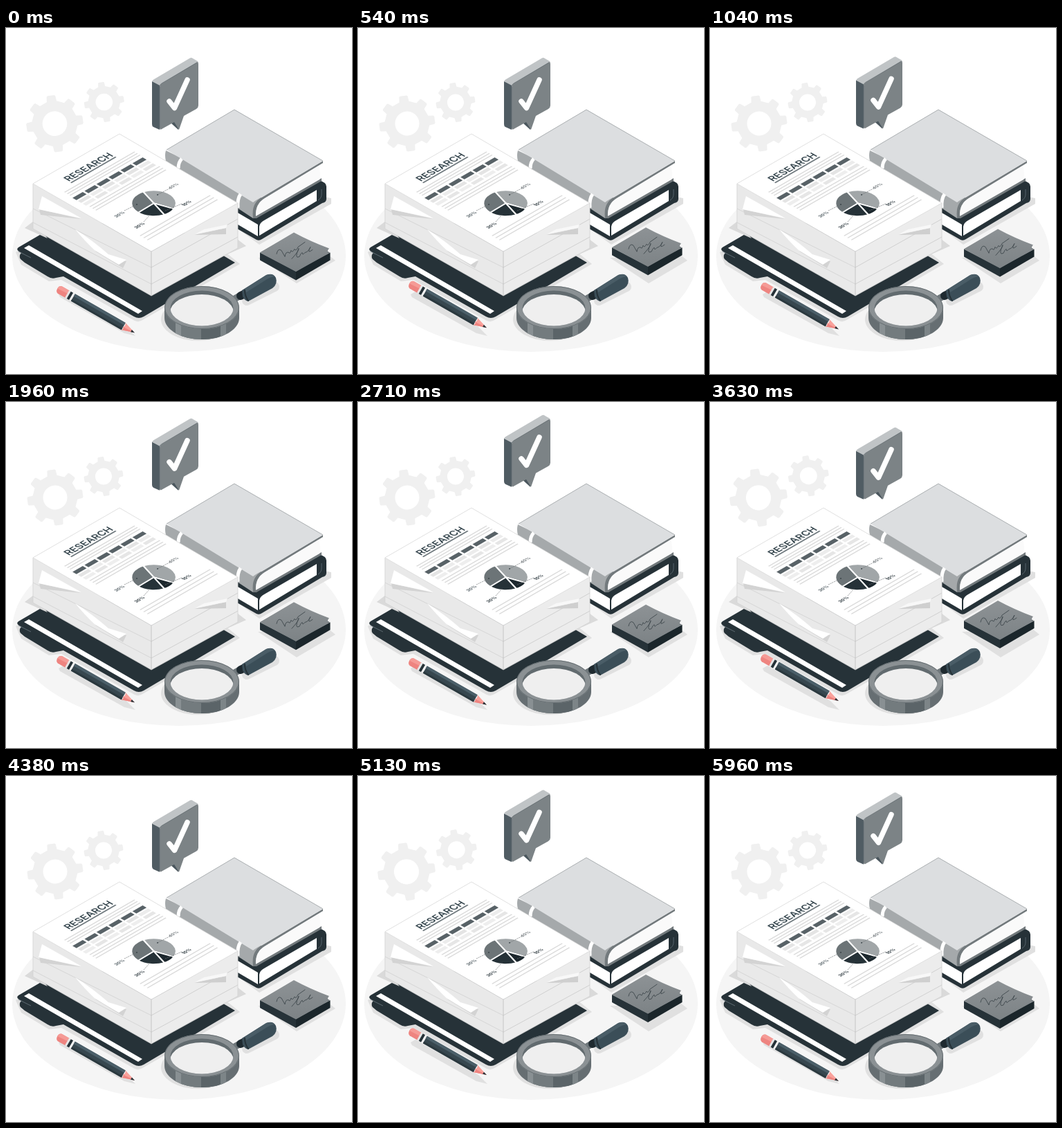
Write an HTML page with a canvas that moves like this. It is 500x500 px and loops after 6000 ms.

```html
<!DOCTYPE html>
<html lang="en">
<head>
<meta charset="utf-8">
<title>Research</title>
<style>
html, body { margin: 0; width: 100%; height: 100%; overflow: hidden; background: #fff; }
canvas { display: block; width: 500px; height: 500px; }
</style>
</head>
<body>
<canvas id="stage"></canvas>
<script>
const canvas = document.getElementById('stage');
const ctx = canvas.getContext('2d');
const ratio = Math.max(1, window.devicePixelRatio || 1);
canvas.width = canvas.height = 500 * ratio;

const LOOP = 6000, LEAD = 40, BEAT = 1500;
const TAU = Math.PI * 2, DEG = Math.PI / 180;
const DARK = '#263238', SLATE = '#37474f', SHADE = '#e0e0e0';

function fill(path, color) {
  ctx.fillStyle = color;
  ctx.fill(new Path2D(path));
}
function stroke(path, color, width = 1) {
  ctx.strokeStyle = color;
  ctx.lineWidth = width;
  ctx.stroke(new Path2D(path));
}
function oval(x, y, rx, ry, color) {
  ctx.fillStyle = color;
  ctx.beginPath();
  ctx.ellipse(x, y, rx, ry, 0, 0, TAU);
  ctx.fill();
}
function rect(x, y, w, h, color) {
  ctx.fillStyle = color;
  ctx.fillRect(x, y, w, h);
}
function group(draw) {
  ctx.save();
  draw();
  ctx.restore();
}

// 0 -> 1 -> 0 over one period
const swing = (t, period) => 1 - Math.abs(1 - 2 * (t % period) / period);

// two quick pulses, then rest
function heartbeat(t) {
  const p = (t % BEAT) / BEAT;
  if (p < 0.1) return p / 0.1;
  if (p < 0.3) return (0.3 - p) / 0.2;
  return Math.max(0, 1 - Math.abs(p - 0.5) / 0.1);
}

function gear(x, y, r, hole, angle) {
  group(() => {
    ctx.translate(x, y);
    ctx.rotate(angle);
    ctx.fillStyle = '#f0f0f0';
    ctx.beginPath();
    for (let i = 0; i < 8; i++) {
      const a = i * TAU / 8;
      const at = (rad, off) => ctx.lineTo(rad * Math.cos(a + off * DEG), rad * Math.sin(a + off * DEG));
      at(r * 0.8, -12.5);
      at(r * 0.98, -9);
      at(r, -6.5);
      at(r, 6.5);
      at(r * 0.98, 9);
      at(r * 0.8, 12.5);
    }
    ctx.closePath();
    ctx.moveTo(hole, 0);
    ctx.arc(0, 0, hole, 0, TAU, true);
    ctx.fill();
  });
}

function gears(pulse) {
  group(() => {
    const s = 1 + 0.07 * pulse;
    ctx.translate(100, 129);
    ctx.scale(s, s);
    ctx.translate(-100, -129);
    gear(71, 138, 40.5, 17.5, -8 * DEG);
    gear(141, 107.5, 28.5, 12, -9 * DEG);
  });
}

function books() {
  fill('M335 290 L366 313 L470 254 L470 246 L440 240 Z', SHADE);
  // lower book
  fill('M334 257 L360 272 L452 220 Q463 223 463 229 V247 Q463 252 457 253 L370 305 Q366 308 362 306 L334 290 Z', DARK);
  fill('M335 267 L364 284 V301 L335 284 Z', '#fff');
  fill('M366 287 Q367 281 373 278 L449 234 V250 L366 300 Z', '#fff');
  stroke('M451 249 Q456 246 456 240 V233', '#55626a', 1);
  // upper book
  fill('M231 177 Q229 184 231 192 L357 275 L372 247 L360 240 Z', '#a5a9ab');
  fill('M357 275 Q354 252 371 244 L458 192 V195 L374 246 Q360 254 361 272 L456 217 V221 L362 275 Z', '#737a7d');
  fill('M361 272 Q360 254 374 246 L452 199 Q455 209 453 219 Z', '#fafafa');
  fill('M330 118 L458 192 L374 242 Q362 248 357 252 L232 176 Z', '#dcdee0');
  stroke('M232 176 L330 118 L458 192', '#9a9fa1', 0.8);
  stroke('M254 189 Q249 194 249 203', '#fff', 5);
  stroke('M339 240 Q334 247 335 260', '#fff', 5);
}

function folder() {
  fill('M14 324 L22 342 L62 366 L80 364 L186 423 Q192 426 199 421 L338 341 L300 310 L54 300 Z', SHADE);
  fill('M54 296 L18 317 Q14 320 19 323 L22 325 Q18 329 21 334 L27 339 L60 359 Q66 363 72 361 L83 359 L185 417 Q192 421 199 417 L331 339 L215 270 Z', DARK);
  fill('M26 318 L33 314 L197 409 L191 413 Z', '#fff');
  stroke('M18 323 L36 332', '#75818a', 0.7);
}

function stack() {
  fill('M40 279 L27 289 L60 304 Z M334 305 L347 315 L320 327 Z', '#dadada');
  fill('M39 225 L210 323 V387 L39 290 Z', '#e9e9e9');
  fill('M210 323 L335 253 V318 L210 387 Z', '#ececec');
  stroke('M39 261 L210 346 M39 281 L210 370', '#d6d6d6', 1);
  stroke('M210 346 L335 276 M210 370 L335 302', '#d0d0d0', 1);
  stroke('M210 323 V387', '#bcbcbc', 0.8);
  stroke('M39 225 V290 L210 387 L335 318 V253', '#d2d2d2', 0.8);
  fill('M48 262 L50 270 L109 276 Z', '#d3d3d3');
  fill('M52 243 L109 275 L47 262 Z', '#fff');
  fill('M128 322 L169 347 L174 337 Z', '#d3d3d3');
  fill('M100 291 Q124 306 148 327 L174 335 L163 342 Q142 330 128 321 Q114 308 100 291 Z', '#fff');
  fill('M272 299 L318 289 V298 Z', '#cfcfcf');
  fill('M286 291 L320 284 L318 289 L273 298 Z', '#f8f8f8');
  fill('M164 153 L335 253 L210 323 L39 225 Z', '#fff');
  stroke('M39 225 L164 153 L335 253 L210 323 Z', '#d8d8d8', 0.8);
}

function pie(x, y, r) {
  const parts = [[40, '#a1a6a8'], [10, '#1c272d'], [20, DARK], [30, '#6c7477']];
  let a = -73 * DEG;
  for (const [share, color] of parts) {
    const b = a + share / 100 * TAU;
    ctx.beginPath();
    ctx.moveTo(x, y);
    ctx.arc(x, y, r, a, b);
    ctx.closePath();
    ctx.fillStyle = color;
    ctx.fill();
    ctx.strokeStyle = '#fff';
    ctx.lineWidth = 2;
    ctx.stroke();
    a = b;
  }
}

function report() {
  // sheet plane: u runs up-right, v runs down-right
  group(() => {
    ctx.transform(0.866, -0.5, 0.866, 0.5, 39, 225);
    ctx.textAlign = 'center';
    ctx.fillStyle = SLATE;
    ctx.font = '600 14px Inter, Roboto, sans-serif';
    ctx.fillText('RESEARCH', 70.5, 27);
    rect(33, 29.3, 75, 2, '#6f797e');
    for (const v of [38, 42.5, 47, 80, 85, 90, 164, 170, 176]) rect(14, v, 117, 1.6, '#dadada');
    for (let i = 0; i < 6; i++) {
      const u = 12.5 + i * 20;
      rect(u, 53.5, 17, 6.5, '#586267');
      rect(u, 62.5, 17, 5.5, i % 2 ? '#ececec' : '#e4e4e4');
      rect(u, 70.5, 17, 5.5, i % 2 ? '#e6e6e6' : '#eeeeee');
    }
    pie(72.5, 129, 26.5);
  });
  group(() => {
    ctx.setLineDash([2, 1]);
    stroke('M219 241 L236 232 M171 264 L189 255 M199 280 L209 269 M230 264 L254 254', '#6a6f72', 0.7);
  });
  oval(219, 241, 1, 0.8, DARK);
  oval(189, 255, 1, 0.8, DARK);
  const labels = [['40%', 243, 229, '#777d80'], ['10%', 262, 254, DARK], ['30%', 194, 286, DARK], ['30%', 165, 270, '#4c585e']];
  for (const [text, x, y, color] of labels) {
    group(() => {
      ctx.transform(0.866, -0.5, 0.866, 0.5, x, y);
      ctx.font = '700 6.3px Inter, Roboto, sans-serif';
      ctx.textAlign = 'center';
      ctx.fillStyle = color;
      ctx.fillText(text, 0, 1);
    });
  }
}

function bubble(lift) {
  group(() => {
    ctx.translate(0, -29 * lift);
    ctx.lineJoin = ctx.lineCap = 'round';
    fill('M238 137 L249 147 L255 128 Z', '#4a565d');
    fill('M211 77 L222 82 V147 L213 143 Q211 142 211 139 Z', '#505c63');
    fill('M211 77 Q212 75 214 74 L265 44 Q268 42 270 44 L277 48 L278 50 L222 83 Z', '#c0c4c6');
    fill('M222 85 Q222 82 225 80 L275 50 Q278 48 278 52 V112 Q278 115 275 117 L257 127 L250 147 L243 136 L225 146 Q222 148 222 144 Z', '#7c8386');
    stroke('M222 145 V84 Q222 82 225 80 L276 50', '#636c70', 0.7);
    stroke('M236 106 L243.5 115.5 L262 75', '#fff', 7.5);
  });
}

function note(lift) {
  fill('M364 332 L420 369 L476 336 L466 328 Z', SHADE);
  group(() => {
    ctx.translate(0, -10 * lift);
    ctx.lineCap = ctx.lineJoin = 'round';
    fill('M367 325 V336 L419 365 V352 Z', DARK);
    fill('M419 352 V365 L468.5 336 V325 Z', '#1b262b');
    fill('M367 325 L416 297 L468 325 L419 352.5 Z', '#6f767a');
    const tone = ctx.createLinearGradient(416, 296, 419, 352);
    tone.addColorStop(0, '#8d9295');
    tone.addColorStop(1, '#7d8386');
    fill('M367 325 L416 296 Q440 309 467 319 Q464 322 465 326 L419 352.5 Z', tone);
    stroke('M391 327 Q393 318 398 322 L403 331 Q404 323 409 325 Q410 328 412 322 Q414 326 417 320 Q419 324 422 317 L432 310', '#40494d', 0.9);
    stroke('M413 334 Q424 322 423 319 Q416 335 424 331 Q426 326 428 325 Q428 330 432 325 Q436 325 440 317 Q434 328 443 321', '#40494d', 0.9);
  });
}

function magnifier() {
  group(() => {
    ctx.lineCap = 'round';
    oval(278, 421, 54, 31, SHADE);
    stroke('M348 394 L388 374', SHADE, 14);
    // handle
    stroke('M331 391 L338 387', '#6d7579', 10);
    stroke('M339 387 L345 384', '#1f2a30', 12);
    fill('M341 379 L376 357 Q386 353 390 361 Q393 370 385 376 L350 395 Q345 394 342 388 Z', '#3b4e58');
    fill('M345 377 L376 357 Q384 354 388 359 Q381 360 374 365 L347 382 Z', '#4a5d67');
    stroke('M345 379 Q345 387 350 394', DARK, 2);
  });
  // rim with depth
  const rim = 'M229 404 V419 A54 31 0 0 0 337 419 V404 Z';
  fill(rim, '#666e72');
  group(() => {
    ctx.clip(new Path2D(rim));
    rect(245, 395, 8, 60, '#899093');
    rect(253, 395, 29, 60, '#737b7e');
    rect(282, 395, 28, 60, '#5b6468');
    rect(310, 395, 8, 60, '#7d8588');
  });
  oval(283, 404, 54, 31, '#8b9194');
  group(() => {
    ctx.beginPath();
    ctx.ellipse(283, 405, 45.5, 25.5, 0, 0, TAU);
    ctx.clip();
    rect(229, 375, 110, 60, '#626b6f');
    oval(283, 411, 46, 26, '#efefef');
  });
  ctx.beginPath();
  ctx.ellipse(283, 404, 53.5, 30.5, 0, 0, TAU);
  ctx.strokeStyle = '#5c6569';
  ctx.lineWidth = 0.8;
  ctx.stroke();
}

function pencil(lift) {
  fill('M76 385 L83 381 L174 432 L187 445 L171 441 L78 389 Z', SHADE);
  group(() => {
    ctx.translate(76, 378 - 10 * lift);
    ctx.rotate(29.8 * DEG);
    fill('M15 -6 H2 Q-2 -5 -2 0 Q-2 5 2 6 H15 Z', '#ee8480');
    fill('M15 -6 H2 Q-2 -5 -2 0 L15 -1 Z', '#f59b96');
    rect(14, -6, 3, 12, '#e6e6e6');
    rect(17, -6, 4, 12, DARK);
    rect(21, -6, 3, 12, '#f5f5f5');
    rect(24, -6, 84, 12, SLATE);
    rect(24, -6, 84, 4, '#4b5f69');
    rect(24, 3, 84, 3, '#2b393f');
    fill('M108 -6 L126.5 0 L108 6 Q111 3 108 1 Q111 -2 108 -6 Z', '#f9a19b');
    fill('M108 1 Q111 3 108 6 L126 0 Z', '#ee8480');
    fill('M121 -1.8 L126.8 0 L121 1.8 Z', DARK);
  });
}

function frame(now) {
  const t = now % LOOP + LEAD;
  const lift = swing(t, BEAT);
  ctx.setTransform(ratio, 0, 0, ratio, 0, 0);
  rect(0, 0, 500, 500, '#fff');
  oval(250, 329, 241, 139, '#f5f5f5');
  gears(heartbeat(t));
  books();
  folder();
  stack();
  report();
  bubble(t < 1000 ? 0 : swing(t - 1000, 2 * BEAT));
  note(lift);
  pencil(lift);
  magnifier();
}

const start = performance.now();
function tick() {
  frame(performance.now() - start);
  requestAnimationFrame(tick);
}
tick();
</script>
</body>
</html>
```
